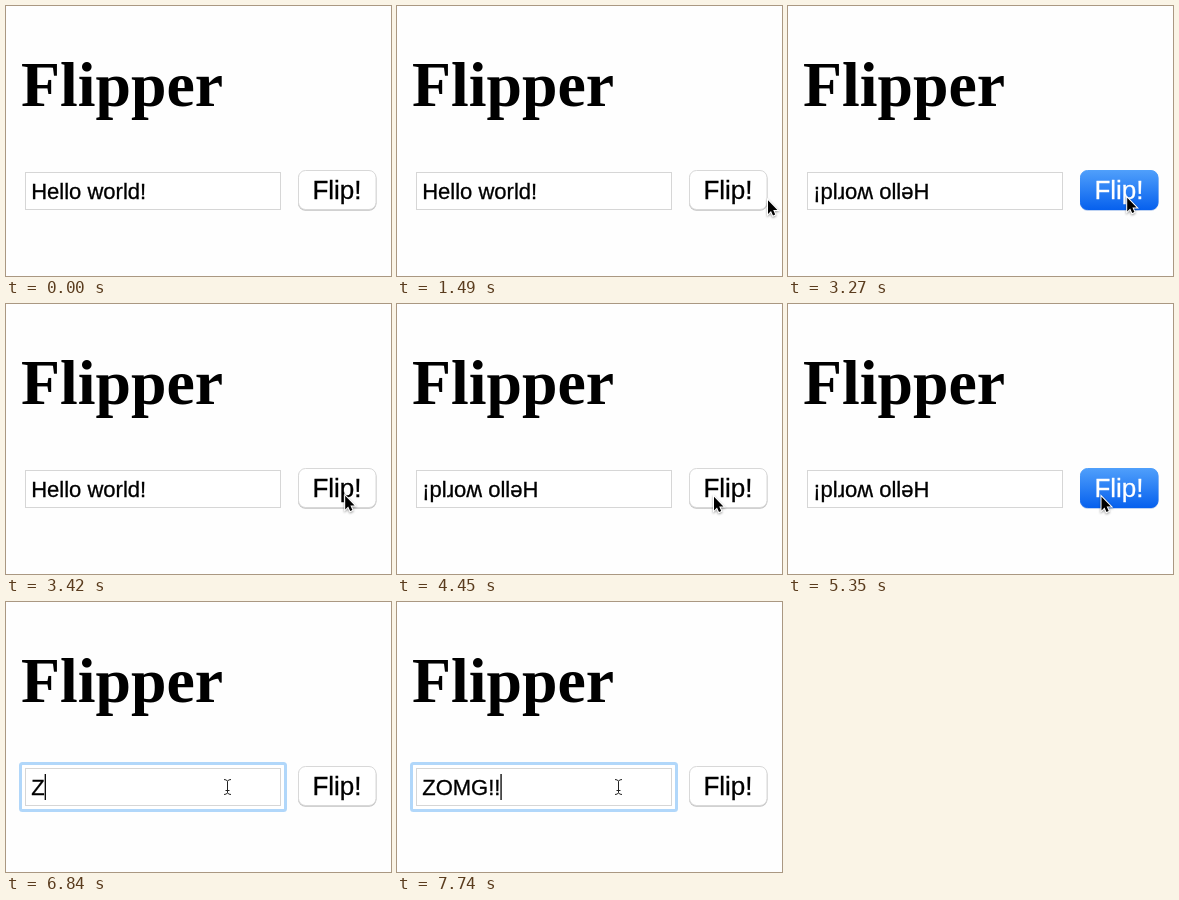
These frames come from a looping animation (385 px wide and 270 px high, 8 s). An HTML page:

```html
<!DOCTYPE html>
<html lang="en">
<head>
<meta charset="utf-8">
<title>Flipper</title>
<style>
  html, body { margin: 0; height: 100%; overflow: hidden; background: #fefefe; }
  svg { display: block; width: 385px; height: 270px; }
  text { white-space: pre; font-family: "Liberation Sans", Arial, sans-serif; }
  .title { font: bold 63.8px "Liberation Serif", Times, serif; }
  .value, .label { stroke: #000; stroke-width: .3; }
  .value { font-size: 22px; }
  .label { font-size: 26px; text-anchor: middle; }
  .face { fill: #fff; stroke: #d8d8d8; }
  .lip { fill: #c2c2c2; }
  .pressed .face { fill: url(#blue); stroke: url(#blue); }
  .pressed .lip { fill: #a9c3ee; }
  .pressed .label { fill: #fff; stroke: #fff; }
  #arrow { filter: drop-shadow(0 1px .8px #0006); }
</style>
</head>
<body>
<svg viewBox="0 0 385 270">
  <defs>
    <linearGradient id="blue" x2="0" y2="1">
      <stop stop-color="#4f9ffb"/>
      <stop offset="1" stop-color="#0761ee"/>
    </linearGradient>
    <path id="beamShape" d="M-3.5 -7.5Q-.4 -7.5 0 -5.5Q.4 -7.5 3.5 -7.5M0 -5.5V5.5M-3.5 7.5Q-.4 7.5 0 5.5Q.4 7.5 3.5 7.5M-2 3.5H2"/>
  </defs>

  <text class="title" x="15" y="99.6">Flipper</text>

  <rect id="ring" x="14.5" y="161.5" width="265" height="47" rx="2" fill="#fff" stroke="#b1d7fa" stroke-width="3"/>
  <rect x="19.5" y="166.5" width="255" height="37" fill="#fff" stroke="#d6d6d6"/>
  <rect id="selection" y="172" height="26" fill="#b5d5ff"/>
  <text id="value" class="value" x="25.2" y="193"></text>
  <rect id="caret" y="172" width="1.3" height="26"/>

  <g id="button">
    <rect class="lip" x="292" y="165.3" width="78.5" height="39.5" rx="7.5"/>
    <rect class="face" x="292.5" y="164.5" width="77.5" height="39" rx="7"/>
    <text class="label" x="331" y="193">Flip!</text>
  </g>

  <path id="arrow" d="M0 0V13.6L3 10.8L5 15.3L7.2 14.3L5.2 9.7H9.4Z" stroke="#fff" stroke-width="2" paint-order="stroke"/>
  <g id="beam" fill="none">
    <use href="#beamShape" stroke="#fff" stroke-width="2.5"/>
    <use href="#beamShape" stroke="#222"/>
  </g>
</svg>
<script>
const LOOP = 8000;
const HELLO = 'Hello world!';
const FLIPPED = '¡plɹoʍ ollǝH';

// Each step overrides part of the state; the rest carries over.
const steps = [
  [0, { text: HELLO, pressed: false, focus: false, select: 0, arrow: null, beam: null }],
  [1490, { arrow: [371, 194.3] }],
  [1640, { arrow: [350, 193] }],
  [1780, { arrow: [339.2, 191.8] }],
  [2080, { pressed: true }],
  [2220, { pressed: false, text: FLIPPED }],
  [3270, { pressed: true }],
  [3420, { pressed: false, text: HELLO }],
  [4010, { text: FLIPPED }],
  [4160, { arrow: [335, 192] }],
  [4310, { arrow: [326, 192.5] }],
  [4450, { arrow: [317, 192.8] }],
  [4600, { arrow: [313.5, 192.8] }],
  [5350, { pressed: true }],
  [5490, { pressed: false, text: HELLO }],
  [5640, { arrow: null, beam: [246, 187] }],
  [5790, { beam: [221.5, 185] }],
  [6090, { focus: true }],
  [6240, { select: 1 }],
  [6390, { select: HELLO.length }],
  [6840, { select: 0, text: 'Z' }],
  [6990, { text: 'ZO' }],
  [7290, { text: 'ZOM' }],
  [7440, { text: 'ZOMG' }],
  [7590, { text: 'ZOMG!' }],
  [7740, { text: 'ZOMG!!' }],
];

const el = id => document.getElementById(id);
const show = (id, on) => el(id).style.display = on ? '' : 'none';

function place(id, point) {
  show(id, point);
  if (point) el(id).setAttribute('transform', `translate(${point})`);
}

function draw(now) {
  const time = now % LOOP;
  const s = Object.assign({}, ...steps.filter(([at]) => at <= time).map(([, change]) => change));

  const value = el('value');
  value.textContent = s.text;
  el('button').classList.toggle('pressed', s.pressed);
  show('ring', s.focus);
  show('caret', s.focus && !s.select);
  show('selection', s.select);

  const last = s.text.length - 1;
  const end = value.getEndPositionOfChar(last).x;
  el('caret').setAttribute('x', end);
  if (s.select) {
    const start = value.getStartPositionOfChar(last + 1 - s.select).x;
    el('selection').setAttribute('x', start);
    el('selection').setAttribute('width', end - start);
  }
  place('arrow', s.arrow);
  place('beam', s.beam);
}

const origin = performance.now();
(function tick() {
  draw(performance.now() - origin);
  requestAnimationFrame(tick);
})();
</script>
</body>
</html>
```
